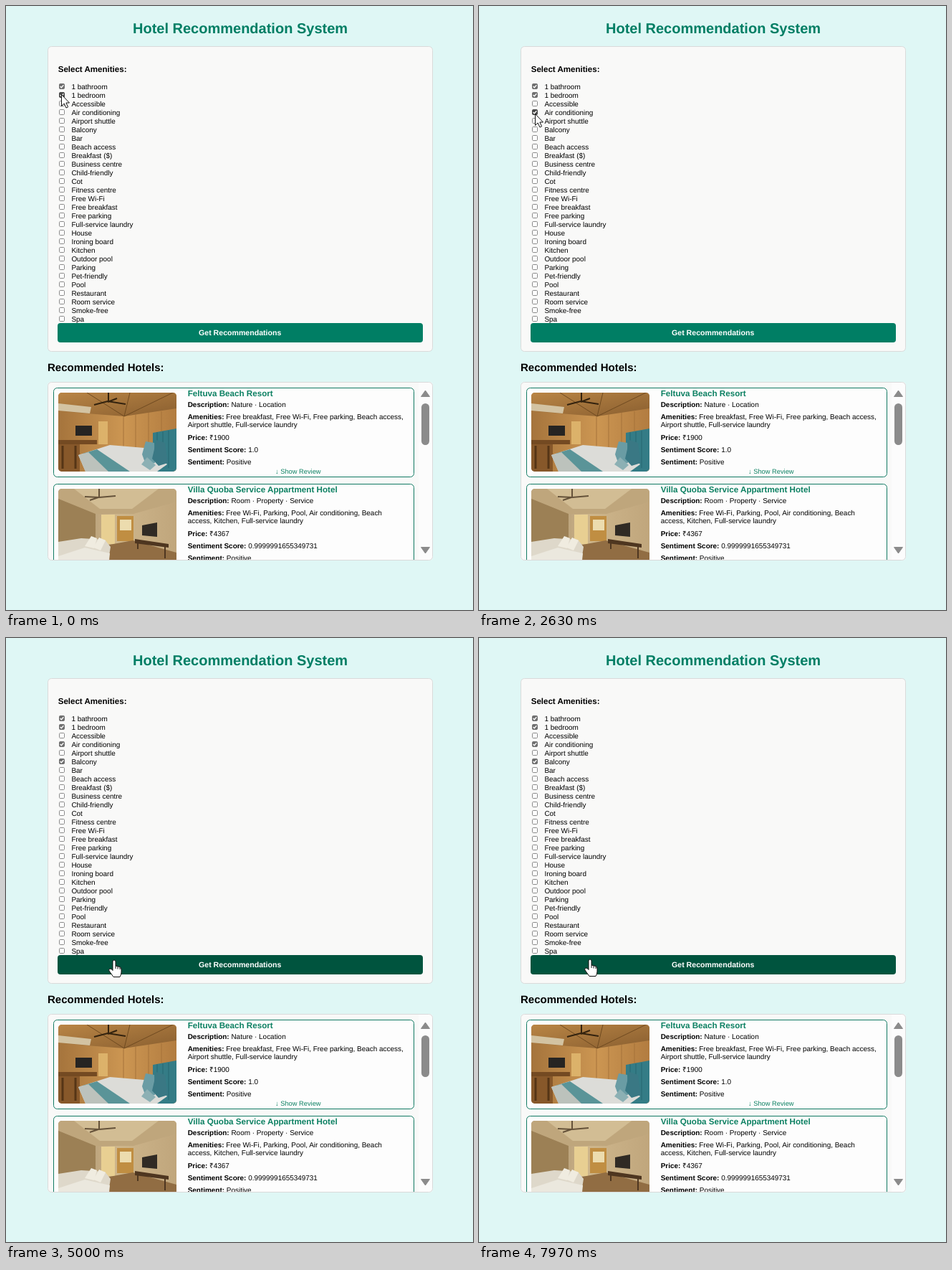
Write an HTML page that moves like this. It is 652 px wide and 842 px high and loops after 8000 ms.

```html
<!DOCTYPE html>
<html lang="en">
<head>
<meta charset="utf-8">
<title>Hotel Recommendation System</title>
<style>
  html, body { margin: 0; width: 100%; height: 100%; overflow: hidden; background: #dff7f5; }
  svg { display: block; width: 652px; height: 842px; }
  text { font-family: "Liberation Sans", Arial, sans-serif; font-size: 9.95px; fill: #000; text-rendering: geometricPrecision; }
  .bold { font-weight: bold; }
  .panel { fill: #f9f9f8; stroke: #dadada; }
  .card { fill: #fdfdfd; stroke: #117a63; }
  .name { font-size: 11.65px; font-weight: bold; fill: #0c8062; }
  .box { fill: #fff; stroke: #8b8b8b; }
  .on .box { fill: #707070; stroke: #707070; }
  .tick { fill: none; stroke: #fff; stroke-width: 1.3; visibility: hidden; }
  .on .tick { visibility: visible; }
  .hover:not(.on) .box { stroke: #505050; }
  .hover.on .box { fill: #484848; stroke: #484848; }
</style>
</head>
<body>
<svg viewBox="0 0 652 842">
  <defs>
    <clipPath id="list"><rect x="58" y="524" width="538" height="249" rx="5"/></clipPath>
    <clipPath id="photo"><rect width="165" height="110" rx="5"/></clipPath>
    <linearGradient id="wood"><stop stop-color="#a5743c"/><stop offset=".55" stop-color="#cc9652"/><stop offset="1" stop-color="#b27c40"/></linearGradient>
    <linearGradient id="ceiling" x2="1" y2="1"><stop stop-color="#b98545"/><stop offset="1" stop-color="#8a5f30"/></linearGradient>
    <linearGradient id="cream"><stop stop-color="#a18866"/><stop offset=".5" stop-color="#ceb68c"/><stop offset="1" stop-color="#c0a67c"/></linearGradient>
  </defs>

  <rect width="652" height="842" fill="#dff7f5"/>
  <text class="bold" x="177" y="38" style="font-size:20px;fill:#007e64">Hotel Recommendation System</text>
  <rect class="panel" x="58.5" y="56.5" width="537" height="425" rx="5"/>
  <text class="bold" x="72.7" y="92" style="font-size:11.55px">Select Amenities:</text>
  <g id="amenities"></g>
  <rect id="button" x="72" y="442" width="510" height="27" rx="4"/>
  <text class="bold" x="269" y="459" style="font-size:10.6px;fill:#fff">Get Recommendations</text>
  <text class="bold" x="58" y="509" style="font-size:15px">Recommended Hotels:</text>

  <g clip-path="url(#list)">
    <rect x="58" y="524" width="538" height="249" fill="#f9f9f8"/>
    <rect x="576" y="525" width="19" height="247" fill="#fcfcfc"/>
    <g id="hotels"></g>

    <g transform="translate(73 539)" clip-path="url(#photo)">
      <rect width="165" height="110" fill="url(#wood)"/>
      <path d="M0 0H165V22L92 33 0 26Z" fill="url(#ceiling)"/>
      <path d="M0 15 46 20 44 29 0 25Z" fill="#d3c3a2"/>
      <path d="M40 0 92 33M100 0 92 33M160 0 92 33" stroke="#6f4a20" fill="none"/>
      <path d="M91 33V92M108 30V85M126 28V80M144 26V70" stroke="#a5733a" fill="none"/>
      <path d="M70 0V13M50 17 69 12 94 16M69 13 82 8" stroke="#33220e" stroke-width="2" fill="none"/>
      <path d="M0 66H54V72H0Z" fill="#744a22"/>
      <path d="M0 72H30V110H0Z" fill="#87582a"/>
      <path d="M6 74V106M24 74V106" stroke="#553516" stroke-width="3"/>
      <rect x="24" y="46" width="23" height="14" fill="#262422"/>
      <path d="M56 40H69V72H56Z" fill="#dcb26a"/>
      <path d="M132 56 165 50V110H132Z" fill="#347c86"/>
      <path d="M138 55V105M146 54V105M154 53V105" stroke="#266670"/>
      <path d="M28 87 72 73 132 78 152 100 138 110H38Z" fill="#dcdcd8"/>
      <path d="M34 85 54 79 100 110H66Z" fill="#5a9498"/>
      <path d="M28 87 42 83 70 110H38Z" fill="#bcc2bc"/>
      <path d="M117 86 122 68 134 70 135 98 122 100Z" fill="#6a9ca4"/>
      <path d="M131 92 137 66 149 70 153 98 140 102Z" fill="#3a7884"/>
      <path d="M116 100 124 90 136 101 128 108Z" fill="#8cb0b4"/>
    </g>

    <g transform="translate(73 673)" clip-path="url(#photo)">
      <rect width="165" height="110" fill="url(#cream)"/>
      <path d="M0 0H165V18L105 35H52L0 14Z" fill="#bfa67c"/>
      <path d="M22 0H140L103 28H58Z" fill="#d2bd94"/>
      <path d="M0 14 52 35V80H0Z" fill="#9c8055"/>
      <path d="M57 0V11M37 11 57 12 80 10M56 12 44 16" stroke="#65523a" stroke-width="2" fill="none"/>
      <path d="M60 36H79V77H60Z" fill="#e8cf92"/>
      <path d="M82 38H105V73H82Z" fill="#c08e42"/>
      <path d="M86 43H102V58H86Z" fill="#ecdcae"/>
      <path d="M66 79 104 72 165 89V110H66Z" fill="#916d43"/>
      <path d="M117 51 138 47V67L117 65Z" fill="#302a24"/>
      <path d="M107 70 154 77V82L107 76Z" fill="#4e3620"/>
      <path d="M111 75V84M149 81V97" stroke="#4e3620" stroke-width="2"/>
      <path d="M0 74 32 69 65 71 73 81 70 100H0Z" fill="#ded8ca"/>
      <path d="M37 80 46 66 54 69 50 83ZM49 82 57 68 66 72 59 86Z" fill="#f0ece0"/>
      <path d="M0 94 37 82 72 90 70 110H0Z" fill="#ebe8de"/>
    </g>

    <rect x="580" y="554" width="11" height="58" rx="5.5" fill="#8b8b8b"/>
    <path d="M579.5 544.5 585.5 536 591.5 544.5ZM579.5 754.5 585.5 763 591.5 754.5Z" fill="#8b8b8b" stroke="#8b8b8b" stroke-linejoin="round"/>
  </g>
  <rect x="58.5" y="524.5" width="537" height="248" rx="5" fill="none" stroke="#dadada"/>

  <path id="arrow" d="M.5 .5V16.5L4.2 13 7 19 9.6 17.8 6.9 12H11.5Z" fill="#fff" stroke="#111"/>
  <g id="hand" fill="#fff" stroke="#111" stroke-linejoin="round">
    <path d="M-2 2Q-2 0 0 0T2 2V8L8 9.5Q10 10 10 13V17Q10 20 8 23.5H-1L-7 15Q-8 12.5-6 12T-2 14.5Z"/>
    <path d="M2 8V12M5 9V12.5M8 10V13" fill="none"/>
  </g>
</svg>
<script>
const LOOP = 8000;
const $ = id => document.getElementById(id);

const amenities = ["1 bathroom", "1 bedroom", "Accessible", "Air conditioning", "Airport shuttle", "Balcony", "Bar",
  "Beach access", "Breakfast ($)", "Business centre", "Child-friendly", "Cot", "Fitness centre", "Free Wi-Fi",
  "Free breakfast", "Free parking", "Full-service laundry", "House", "Ironing board", "Kitchen", "Outdoor pool",
  "Parking", "Pet-friendly", "Pool", "Restaurant", "Room service", "Smoke-free", "Spa"];
const checkedAt = { 0: 0, 1: 0, 3: 2100, 5: 3900 };

const hotels = [
  { y: 532, name: "Feltuva Beach Resort", description: "Nature · Location",
    amenities: ["Free breakfast, Free Wi-Fi, Free parking, Beach access,", "Airport shuttle, Full-service laundry"],
    price: "₹1900", score: "1.0" },
  { y: 666, name: "Villa Quoba Service Appartment Hotel", description: "Room · Property · Service",
    amenities: ["Free Wi-Fi, Parking, Pool, Air conditioning, Beach", "access, Kitchen, Full-service laundry"],
    price: "₹4367", score: "0.9999991655349731" }
];

$("amenities").innerHTML = amenities.map((label, i) => `
  <g transform="translate(74 ${108 + 12 * i})">
    <rect class="box" x=".5" y=".5" width="7" height="7" rx="1.2"/>
    <path class="tick" d="M1.6 4 3.3 5.7 6.4 2.2"/>
    <text x="17.4" y="8">${label}</text>
  </g>`).join("");

const line = (y, label, value) =>
  `<text x="253.7" y="${y}">${label ? `<tspan class="bold">${label}:</tspan> ` : ""}${value}</text>`;

$("hotels").innerHTML = hotels.map(h => `
  <rect class="card" x="66.5" y="${h.y + .5}" width="503" height="124" rx="5"/>
  <text class="name" x="253.7" y="${h.y + 12}">${h.name}</text>
  ${line(h.y + 26.5, "Description", h.description)}
  ${line(h.y + 44, "Amenities", h.amenities[0])}
  ${line(h.y + 55, "", h.amenities[1])}
  ${line(h.y + 72.5, "Price", h.price)}
  ${line(h.y + 89.5, "Sentiment Score", h.score)}
  ${line(h.y + 106.5, "Sentiment", "Positive")}
  <text x="376" y="${h.y + 120}" style="font-size:9.3px;fill:#0c8062">↓ Show Review</text>`).join("");

// Keys are [time, ...values]; motion eases in and out between neighbours.
const cursorKeys = [[0, 77, 123], [300, 77, 126], [950, 77, 126], [1550, 78, 149], [2500, 78, 149],
  [3550, 78, 169], [4050, 78, 171], [4570, 106, 461], [5100, 155, 448], [LOOP, 155, 448]];
const buttonKeys = [[0, 0, 126, 100], [4470, 0, 126, 100], [4770, 0, 84, 62], [LOOP, 0, 84, 62]];

function sample(keys, t) {
  const i = Math.max(1, keys.findIndex(k => k[0] >= t));
  const [t0, ...from] = keys[i - 1], [t1, ...to] = keys[i];
  const p = (t - t0) / (t1 - t0), eased = p * p * (3 - 2 * p);
  return from.map((v, n) => v + (to[n] - v) * eased);
}

const rows = [...$("amenities").children];

function draw(now) {
  const t = now % LOOP;
  const [x, y] = sample(cursorKeys, t).map(Math.round);
  const overButton = y >= 442;
  rows.forEach((row, i) => {
    const top = 108 + 12 * i;
    row.classList.toggle("on", t >= checkedAt[i]);
    row.classList.toggle("hover", x >= 74 && x <= 82 && y >= top && y < top + 12);
  });
  $("button").setAttribute("fill", `rgb(${sample(buttonKeys, t).map(Math.round)})`);
  for (const id of ["arrow", "hand"]) {
    $(id).setAttribute("transform", `translate(${x} ${y})`);
    $(id).style.display = (id === "hand") === overButton ? "" : "none";
  }
  requestAnimationFrame(draw);
}
requestAnimationFrame(draw);
</script>
</body>
</html>
```
